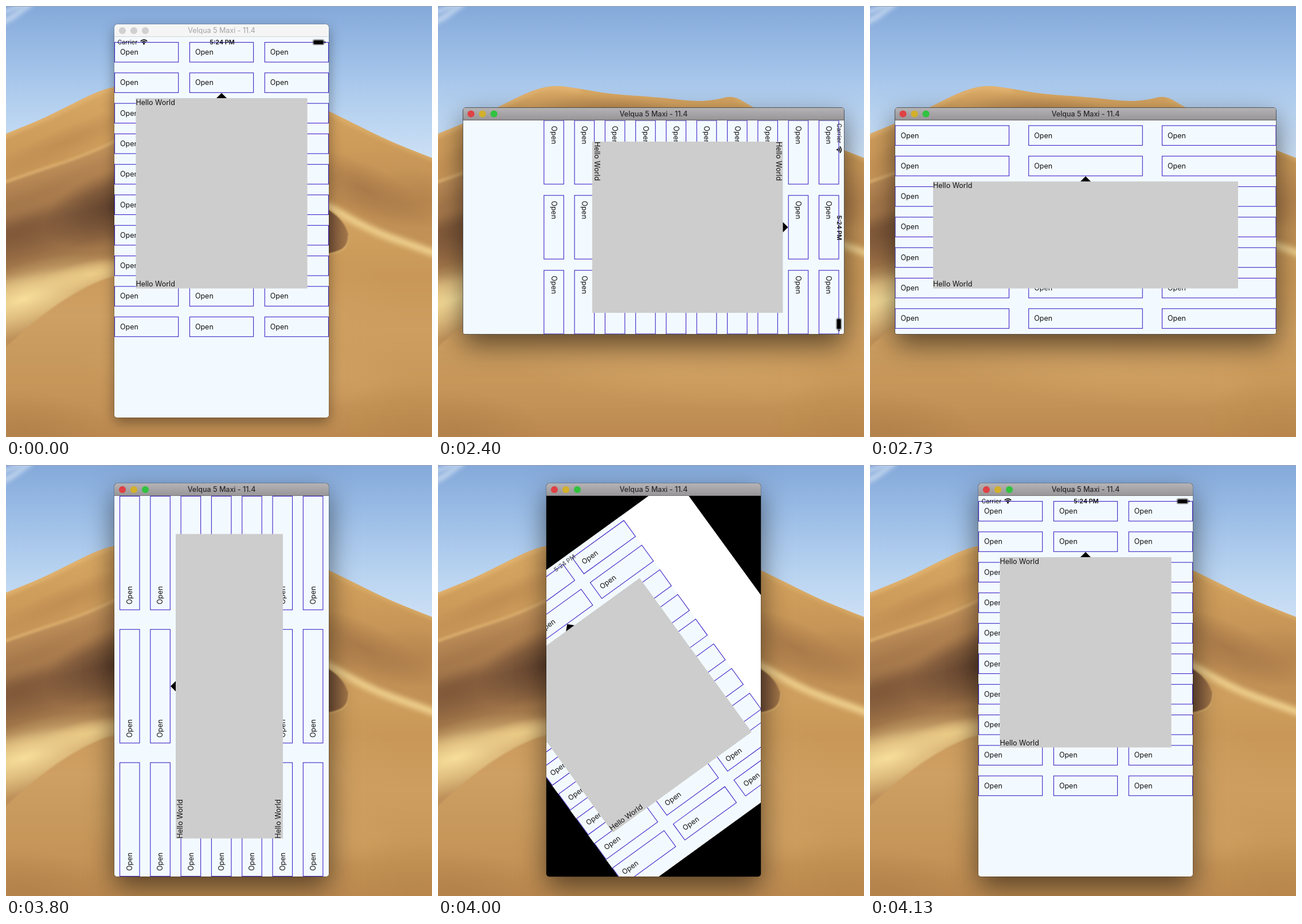
An HTML page with a canvas that plays this animation: 743x753 px, repeating every 4930 ms.

```html
<!DOCTYPE html>
<html lang="en">
<head>
<meta charset="utf-8">
<title>Popover rotation</title>
<style>
  html, body { margin: 0; width: 100%; height: 100%; overflow: hidden; }
  canvas { display: block; }
</style>
</head>
<body>
<canvas id="stage" width="743" height="753"></canvas>
<script>
const WIDTH = 743, HEIGHT = 753, LOOP = 4930;
const ACTIVATE = 1330, TO_LANDSCAPE = 2400, TO_PORTRAIT = 3800;
const STEP = 66, STEPS = 5;
const CENTER = { x: 376, y: 386.5 }, TITLE_BAR = 22;
const PORTRAIT = { w: 374, h: 665 }, LANDSCAPE = { w: 665, h: 374 };
const FONT = 'Inter, "Noto Sans", sans-serif';

const ctx = document.getElementById('stage').getContext('2d');
const mix = (a, b, p) => a + (b - a) * p;

function gradient(c, x0, y0, x1, y1, colors) {
  const g = c.createLinearGradient(x0, y0, x1, y1);
  colors.forEach((color, i) => g.addColorStop(i / (colors.length - 1), color));
  return g;
}

// ---- Desert backdrop, painted once ----

function curve(c, points) {
  c.moveTo(...points[0]);
  for (let i = 1; i < points.length - 1; i++) {
    const [x, y] = points[i], [nx, ny] = points[i + 1];
    const last = i === points.length - 2;
    c.quadraticCurveTo(x, y, last ? nx : (x + nx) / 2, last ? ny : (y + ny) / 2);
  }
}

function dune(c, ridge, fill, blur = 0) {
  c.filter = blur ? `blur(${blur}px)` : 'none';
  c.fillStyle = fill;
  c.beginPath();
  curve(c, ridge);
  c.lineTo(ridge[ridge.length - 1][0], 820);
  c.lineTo(ridge[0][0], 820);
  c.fill();
  c.filter = 'none';
}

function streak(c, points, color, width, blur) {
  c.filter = `blur(${blur}px)`;
  c.strokeStyle = color;
  c.lineWidth = width;
  c.beginPath();
  curve(c, points);
  c.stroke();
  c.filter = 'none';
}

function glow(c, x, y, rx, ry, turn, rgb, alpha) {
  c.save();
  c.translate(x, y);
  c.rotate(turn);
  c.scale(rx, ry);
  const g = c.createRadialGradient(0, 0, 0, 0, 0, 1);
  g.addColorStop(0, `rgba(${rgb},${alpha})`);
  g.addColorStop(0.5, `rgba(${rgb},${alpha * 0.55})`);
  g.addColorStop(1, `rgba(${rgb},0)`);
  c.fillStyle = g;
  c.fillRect(-1, -1, 2, 2);
  c.restore();
}

function paintBackdrop() {
  const canvas = document.createElement('canvas');
  canvas.width = WIDTH;
  canvas.height = HEIGHT;
  const c = canvas.getContext('2d');

  c.fillStyle = gradient(c, 0, 0, 0, 260, ['#84a9da', '#9bbde6', '#b4d0ef', '#cbdff5']);
  c.fillRect(0, 0, WIDTH, HEIGHT);
  streak(c, [[-10, 30], [8, 22], [26, 8], [46, -6]], 'rgba(225,235,248,.75)', 8, 4);
  streak(c, [[-10, 14], [10, 6], [30, -4]], 'rgba(235,240,250,.6)', 6, 3);
  c.fillStyle = '#9aa3ae';
  c.fillRect(0, 0, WIDTH, 1);

  const skyline = [[-40, 240], [0, 223], [60, 199], [110, 174], [160, 149], [200, 138], [245, 144],
    [300, 154], [380, 159], [450, 167], [485, 164], [515, 156], [547, 176], [600, 202], [660, 232], [708, 252], [790, 284]];
  dune(c, skyline, gradient(c, 0, 140, 0, 753,
    ['#d9a864', '#cd9b5a', '#be8d53', '#c49458', '#cb9b5e', '#c8985a', '#bd8b4f']));

  c.save();
  c.beginPath();
  curve(c, skyline);
  c.lineTo(790, 820);
  c.lineTo(-40, 820);
  c.clip();

  // Left slopes
  streak(c, [[-20, 232], [60, 200], [110, 175], [160, 150], [200, 139], [250, 146]], '#e5b875', 8, 4);
  glow(c, 300, 180, 140, 26, 0.06, '150,103,60', 0.4);
  glow(c, 110, 235, 150, 26, -0.4, '178,126,74', 0.45);
  dune(c, [[-40, 322], [0, 308], [60, 286], [120, 267], [189, 238], [300, 190], [330, 260]],
    gradient(c, 60, 275, 110, 470, ['#c3935b', '#a87a4c', '#8d6543', '#9b7047', '#be915a']), 1);
  streak(c, [[-20, 314], [60, 286], [120, 267], [189, 238], [250, 205]], '#dfb473', 4, 2);
  glow(c, 190, 350, 130, 65, -0.35, '82,54,38', 0.75);
  glow(c, 20, 400, 120, 45, -0.25, '116,78,49', 0.55);
  streak(c, [[-20, 374], [60, 350], [130, 310], [200, 280]], 'rgba(200,150,92,.35)', 14, 9);
  glow(c, 30, 512, 190, 62, -0.3, '247,222,154', 1);
  glow(c, 150, 468, 90, 24, -0.18, '242,212,142', 0.8);
  streak(c, [[-20, 468], [60, 455], [120, 445], [200, 420]], 'rgba(150,108,66,.45)', 14, 9);

  // Right slopes
  streak(c, [[520, 160], [563, 185], [650, 226], [790, 284]], '#deb16b', 9, 4);
  glow(c, 625, 320, 130, 44, 0.45, '146,100,62', 0.5);
  glow(c, 725, 335, 80, 50, 0.4, '160,112,68', 0.3);
  dune(c, [[540, 340], [563, 352], [600, 374], [650, 399], [700, 417], [790, 447]],
    gradient(c, 600, 380, 600, 753, ['#d0a160', '#c99858', '#cd9e60', '#c89859', '#bd8b4e']), 3);
  streak(c, [[545, 340], [600, 372], [650, 397], [700, 415], [790, 447]], '#f0d18e', 12, 5);
  c.fillStyle = gradient(c, 563, 0, 600, 0, ['#755138', '#a77a4b']);
  c.filter = 'blur(1px)';
  c.beginPath();
  c.moveTo(540, 345);
  c.bezierCurveTo(578, 360, 594, 382, 598, 404);
  c.bezierCurveTo(596, 424, 580, 431, 540, 436);
  c.fill();
  c.filter = 'none';
  streak(c, [[560, 434], [582, 431], [597, 417], [598, 400]], '#dab16f', 2, 1);

  // Foreground
  dune(c, [[-40, 635], [0, 595], [45, 555], [90, 520], [140, 490], [189, 470], [300, 455], [450, 470], [560, 500], [600, 540]],
    gradient(c, 0, 470, 0, 753, ['#cb9b5d', '#cfa063', '#c99a5d', '#c59458', '#bc8a50']), 1);
  glow(c, 580, 570, 120, 130, 0, '205,158,95', 0.9);
  glow(c, 420, 640, 300, 60, 0.08, '216,170,107', 0.45);
  glow(c, 30, 740, 170, 70, 0.1, '160,112,64', 0.35);
  glow(c, 720, 740, 150, 90, 0, '172,122,68', 0.3);
  c.restore();
  return canvas;
}

// ---- Simulator screen ----

function label(text, x, y, size = 12.5, weight = 400, color = '#111', align = 'left') {
  ctx.font = `${weight} ${size}px ${FONT}`;
  ctx.fillStyle = color;
  ctx.textAlign = align;
  ctx.textBaseline = 'middle';
  ctx.fillText(text, x, y);
}

function drawContent({ w, h }) {
  ctx.fillStyle = '#f3faff';
  ctx.fillRect(0, 0, w, h);

  ctx.strokeStyle = '#3c24c6';
  ctx.lineWidth = 1.1;
  for (let i = 0; i < 30; i++) {
    const x = (i % 3) * w * 0.35, y = 9 + Math.floor(i / 3) * 53.3;
    ctx.strokeRect(x + 0.5, y + 0.5, w * 0.3 - 1, 34.5);
    label('Open', x + 10, y + 18.3);
  }

  const left = w * 0.1, top = 107;
  ctx.fillStyle = '#cdcdcd';
  ctx.fillRect(left, top, w * 0.8, h / 2);
  ctx.fillStyle = '#000';
  ctx.beginPath();
  ctx.moveTo(w / 2 - 9, top);
  ctx.lineTo(w / 2, top - 9);
  ctx.lineTo(w / 2 + 9, top);
  ctx.fill();
  label('Hello World', left, top + 8);
  label('Hello World', left, top + h / 2 - 7.5);
}

function drawStatusBar(w, alpha) {
  ctx.save();
  ctx.globalAlpha = alpha;
  label('Carrier', 5.5, 9.7, 10.6);
  label('5:24 PM', w / 2 + 1, 9.7, 10.8, 600, '#111', 'center');

  ctx.strokeStyle = ctx.fillStyle = '#000';
  ctx.lineWidth = 1.7;
  for (const radius of [4.8, 7.8]) {
    ctx.beginPath();
    ctx.arc(51.5, 13, radius, -Math.PI * 0.76, -Math.PI * 0.24);
    ctx.stroke();
  }
  ctx.beginPath();
  ctx.moveTo(51.5, 14);
  ctx.arc(51.5, 13, 2.5, -Math.PI * 0.78, -Math.PI * 0.22);
  ctx.fill();

  ctx.lineWidth = 0.7;
  ctx.strokeStyle = '#555';
  ctx.beginPath();
  ctx.roundRect(w - 28, 4.5, 20, 9.5, 2.5);
  ctx.stroke();
  ctx.beginPath();
  ctx.roundRect(w - 26.7, 5.7, 17.5, 7.2, 1.5);
  ctx.roundRect(w - 7.3, 7.5, 1.3, 3.5, 0.6);
  ctx.fill();
  ctx.restore();
}

function drawScreen(from, to, progress, turn, statusAlpha) {
  const w = mix(from.w, to.w, progress), h = mix(from.h, to.h, progress);
  ctx.save();
  ctx.translate(CENTER.x, CENTER.y);
  ctx.rotate(turn * (1 - progress) * Math.PI / 2);
  ctx.translate(-w / 2, -h / 2);
  ctx.beginPath();
  ctx.rect(0, 0, w, h);
  ctx.clip();
  ctx.fillStyle = '#fff';
  ctx.fillRect(0, 0, w, h);
  // Layout snaps to the new size as soon as the rotation is under way.
  drawContent(progress > 0 ? to : from);
  drawStatusBar(w, statusAlpha);
  ctx.restore();
}

// ---- Window ----

function drawWindow({ w, h }, active, drawInside) {
  const x = CENTER.x - w / 2, top = CENTER.y - h / 2, y = top - TITLE_BAR;
  const frame = () => {
    ctx.beginPath();
    ctx.roundRect(x, y, w, h + TITLE_BAR, 5);
  };

  ctx.save();
  ctx.shadowColor = `rgba(0,0,0,${active ? 0.55 : 0.38})`;
  ctx.shadowBlur = active ? 48 : 22;
  ctx.shadowOffsetY = active ? 18 : 8;
  ctx.fillStyle = '#000';
  frame();
  ctx.fill();
  ctx.restore();

  ctx.strokeStyle = `rgba(0,0,0,${active ? 0.4 : 0.25})`;
  ctx.lineWidth = 1;
  frame();
  ctx.stroke();

  ctx.save();
  frame();
  ctx.clip();
  drawInside();
  ctx.fillStyle = active ? gradient(ctx, 0, y, 0, top, ['#b5b3b5', '#979597']) : '#f5f5f5';
  ctx.fillRect(x, y, w, TITLE_BAR);
  ctx.fillStyle = active ? '#777577' : '#d3d3d3';
  ctx.fillRect(x, top - 1, w, 1);

  const lights = active ? ['#df4145', '#d2b02b', '#31c23f'] : ['#d0d0d0', '#d0d0d0', '#d0d0d0'];
  lights.forEach((color, i) => {
    ctx.fillStyle = color;
    ctx.beginPath();
    ctx.arc(x + 14 + i * 20, y + 11, 6.1, 0, Math.PI * 2);
    ctx.fill();
  });
  label('Velqua 5 Maxi - 11.4', CENTER.x, y + 11.5, 12.5, active ? 500 : 400, active ? '#2b292b' : '#a3a3a3', 'center');
  ctx.restore();
}

const backdrop = paintBackdrop();

function draw(now) {
  const t = now % LOOP;
  const progressSince = start => Math.min(STEPS, Math.floor((t - start) / STEP)) / STEPS;
  ctx.drawImage(backdrop, 0, 0);

  if (t < TO_LANDSCAPE) {
    drawWindow(PORTRAIT, t >= ACTIVATE, () => drawScreen(PORTRAIT, PORTRAIT, 1, 0, 1));
  } else if (t < TO_PORTRAIT) {
    const p = progressSince(TO_LANDSCAPE);
    drawWindow(LANDSCAPE, true, () => drawScreen(PORTRAIT, LANDSCAPE, p, 1, 1 - p));
  } else {
    const p = progressSince(TO_PORTRAIT);
    drawWindow(PORTRAIT, true, () => drawScreen(LANDSCAPE, PORTRAIT, p, -1, p));
  }
  requestAnimationFrame(draw);
}
requestAnimationFrame(draw);
</script>
</body>
</html>
```
